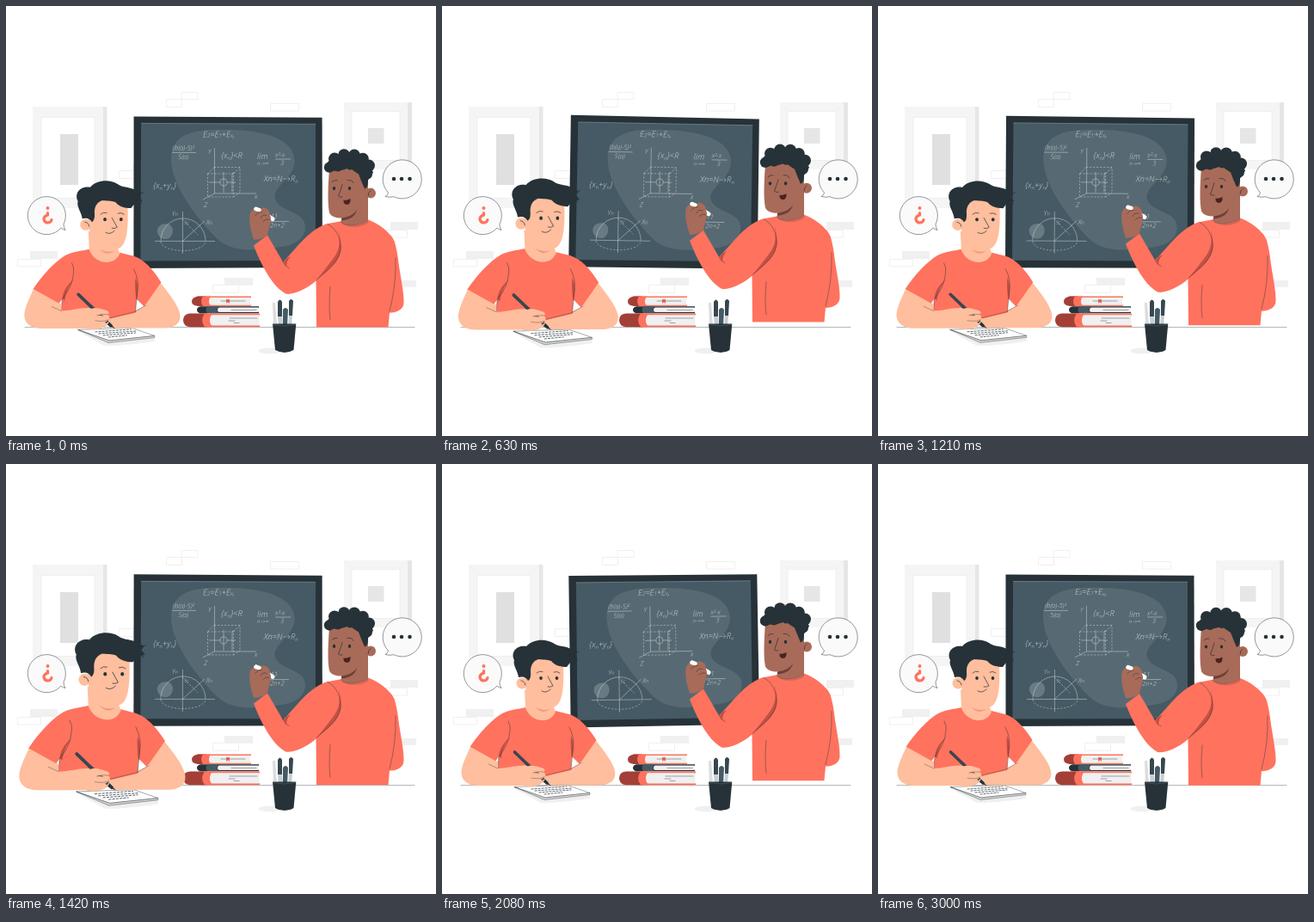
Write an HTML page that moves like this. It is 500 by 500 pixels and loops after 3.04 s.

```html
<!DOCTYPE html>
<html lang="en">
<head>
<meta charset="utf-8">
<title>Maths lesson</title>
<style>
  html, body { margin: 0; width: 100%; height: 100%; overflow: hidden; background: #fff; }
  svg { display: block; width: 100vmin; height: 100vmin; }
  .dark { fill: #263238; }
  .red { fill: #ff725e; }
  .deep { fill: #a33f37; }
  .skin { fill: #ffbe9d; }
  .brown { fill: #a86b59; }
  .pale { fill: #f0f0f0; }
  .line { fill: none; stroke: #263238; stroke-width: .7; stroke-linecap: round; stroke-linejoin: round; }
  .brick { fill: none; stroke: #f0f0f0; }
  .chalk { fill: none; stroke: #dfe5e7; stroke-width: .6; opacity: .75; }
  .dash { stroke-dasharray: 2.2 1.8; }
  text { font: italic 300 9.5px "Open Sans", Lato, sans-serif; fill: #dfe5e7; opacity: .85; }
  .small { font-size: 7.5px; }
  .sub { font-size: 6px; }
</style>
</head>
<body>
<svg viewBox="0 0 500 500">
  <!-- wall -->
  <g>
    <path fill="#e6e6e6" d="M113 117h4.500v118h-4.500z"/>
    <path fill="#f5f5f5" d="M31 117h82v118H31z"/>
    <path fill="#fff" stroke="#ebebeb" stroke-width=".7" d="M41 129.500h62v94H41z"/>
    <path class="brick" d="M31 117l10 12.500M113 117l-10 12.500M103 223.500l10 11.500" stroke-width=".7"/>
    <path fill="#e0e0e0" d="M63 149h21v59H63z"/>
    <path fill="#e6e6e6" d="M467 112h5v78h-5z"/>
    <path fill="#f5f5f5" d="M393 112h74v78h-74z"/>
    <path fill="#fff" stroke="#ebebeb" stroke-width=".7" d="M402 122.500h56v57h-56z"/>
    <path class="brick" d="M393 112l9 10.500M467 112l-9 10.500M458 179.500l9 10.500" stroke-width=".7"/>
    <path fill="#e6e6e6" d="M421 142h18.500v18H421z"/>
    <path class="brick" d="M186.500 108.500h18v9h-18zM204 100.500h19v8h-19zM307.500 113.500h33v8.500h-33zM131.500 191.500h18v9h-18zM13.500 294.500h27v8.500h-27zM240.500 324.500h30v9h-30zM437.500 260.500h29v8.500h-29z"/>
    <path class="pale" d="M28 285h32v9H28zM254 316h33v9h-33zM447 251h32v9h-32zM455 319h22v8h-22z"/>
  </g>

  <g id="board">
    <path class="dark" d="M148.500 128.500L367.500 129.700L368 304L148.500 305Z"/>
    <path fill="#455a64" d="M157 136.500L360 137.200L360 296L156.500 296.500Z"/>
    <path fill="#576a73" d="M192 178C192 156 207 145 240 144C275 143 325 146 334 172C343 198 308 208 313 225C319 240 348 238 348 257C348 273 331 280 312 281C290 284 262 287 245 270C225 250 192 210 192 178Z"/>
    <path d="M157 136.500L360 137.200" stroke="#7f9096" stroke-width=".7"/>
    <path fill="#687b83" d="M176 263C175 255 184 252 190 254C197 258 194 270 187 271C181 272 177 268 176 263Z"/>
    <path class="chalk" d="M193 170.500h28M313 178h18M306 250.500h23
      M242.500 165V218H291M242.500 218L229 225M253 193v24M236 205h13M257 205h10M249 205a4 4 0 1 0 8 0a4 4 0 1 0-8 0M263 217v-21q0-3 3-2
      M173 273.500h70M205.500 239v49M180 273a26 26 0 0 1 52 0M205.500 273.500L231 250"/>
    <path class="chalk dash" d="M234.500 195h30v27h-30zM242 187.500h30v30M264.500 195l7.500-7.500M234.500 195l7.500-7.500M264.500 222l7.500-5M180 274c2 14 50 14 52 0M205 248l18 18"/>
    <text x="229" y="152.500">E<tspan class="sub">2</tspan>=E<tspan class="sub">1</tspan>+E<tspan class="sub">x</tspan>,</text>
    <text class="small" x="194" y="167.500">(b(a)-5)²</text>
    <text class="small" x="200" y="178">5(a)</text>
    <text x="250" y="177">{x<tspan class="sub" dy="2">n</tspan><tspan dy="-2">}&lt;R</tspan></text>
    <text x="292" y="178">lim</text>
    <text class="sub" x="292" y="185">n→∞</text>
    <text class="small" x="313" y="175.500">x²-x</text>
    <text class="small" x="319" y="185">3</text>
    <text x="171" y="212">{x<tspan class="sub" dy="2">n</tspan><tspan dy="-2">+y</tspan><tspan class="sub" dy="2">n</tspan><tspan dy="-2">}</tspan></text>
    <text x="300" y="204">Xn=N→R<tspan class="sub" dy="2">n</tspan></text>
    <text class="small" x="235" y="172">Y</text>
    <text class="small" x="289" y="224">x</text>
    <text class="small" x="230" y="234">Z</text>
    <text class="small" x="193" y="244">Y<tspan class="sub">n</tspan></text>
    <text class="small" x="233" y="254">X<tspan class="sub">n</tspan></text>
    <text class="sub" x="207" y="254">5c</text>
    <text class="small" x="308" y="247">11</text>
    <text class="small" x="307" y="257.500">2n+2</text>
  </g>

  <path class="line" d="M22 373.500H475" stroke-width=".5" opacity=".5"/>

  <!-- books -->
  <g>
    <path class="red" d="M223 337.500h62v1.500h-62zM223 347.500h62v1.500h-62z"/>
    <path class="deep" d="M223 337.500h9v11.500h-9q-7-1-7-5.500t7-6z"/>
    <path class="red" d="M229 337.500h9q-4 6 0 11.500h-9q-4-6 0-11.500z"/>
    <path class="pale" d="M238 339h46v8.500h-46q-3-4 0-8.500z"/>
    <path class="red" d="M256 341h4v5l-2-1.500l-2 1.500z"/>
    <path class="dark" d="M226 349.300h68v1.500h-46v5h46v1.500h-68q-4-1-4-4t4-4z"/>
    <path fill="#455a64" d="M234 349.300h13q-3 4 0 8h-13q-3-4 0-8z"/>
    <path class="pale" d="M247 350.800h46v5h-46q-2-2 0-5z"/>
    <path class="red" d="M225 357.500h70v2h-70zM225 371.300h70v2h-70z"/>
    <path class="deep" d="M214 357.500h20v15.800h-20q-8-1-8-8t8-7.800z"/>
    <path class="red" d="M231 357.500h9q-6 8 0 15.800h-9q-6-8 0-15.800z"/>
    <path class="pale" d="M239 359.500h55.500v11.800H239q-4-6 0-11.800z"/>
    <path class="line" d="M250 343h28M262 353.500h29M260 363h32M259 366h7M265 368.500h6" opacity=".6" stroke-width=".5"/>
  </g>

  <!-- right bubble -->
  <path d="M444.500 217A22.500 22.500 0 1 1 451 221.700Q446 223 441 221.500Q444 220 444.500 217Z" fill="#fafafa" stroke="#263238" stroke-width=".5"/>
  <path d="M451 201h.01M460 201h.01M469.500 201h.01" stroke="#263238" stroke-width="4.600" stroke-linecap="round"/>

  <g id="teacher">
    <path class="red" d="M446 266C453 272 455 286 457 303C460 322 463 336 462.500 346C462 354 453 358 443 357Z"/>
    <path class="red" d="M388 251C396 249 410 247 421 249C432 253 447 263 452 275C456 303 447 330 446 357L444.500 373.800H361L360.500 320C348 331 332 337 325 335C309 326 296 300 288 279L304 267L322 298C336 285 350 262 372 254Z"/>
    <path fill="#a33f37" opacity=".65" d="M387 262C389 278 388 286 376 300C369 309 366 313 361 319C376 307 390 296 389.500 280C389 272 388 267 387 262Z"/>
    <path class="line" d="M374 254C384 259 390 271 389 284C386 301 371 309 361 319M377 327Q375 349 377 365M453 293Q454 325 446 355M322 298Q324 303 329 305" opacity=".6"/>
    <path fill="#a33f37" opacity=".7" d="M323 298q4-6 8-6q-5 4-5 12z"/>
    <path class="brown" d="M376 190C374 215 374 232 376 241C379 247 387 247 391 247L389 252C396 259 413 255 421 250L421 222L421 190Z"/>
    <circle class="brown" cx="424" cy="218" r="6"/>
    <path fill="#6f3f36" d="M390 247C399 246 406 242 408 237C407 245 400 249 390 250Z"/>
    <path fill="#263238" opacity=".2" d="M389 251.500C398 258 413 254 421 249.500L421 253C409 260 394 258 389 251.500Z"/>
    <g class="dark">
      <path d="M376 192L374 182L384 173L404 172L420 180L427 194L421 203Q421 212 417 213Q413 204 410 196Q405 193 400 189Q388 193 376 192Z"/>
      <circle cx="376" cy="188" r="6.200"/><circle cx="382" cy="178" r="7"/>
      <circle cx="393" cy="173.500" r="6.800"/><circle cx="405" cy="174" r="7"/>
      <circle cx="415" cy="178" r="6.800"/><circle cx="422" cy="186" r="7"/>
      <circle cx="420" cy="196" r="6"/><circle cx="400" cy="185" r="6"/>
      <circle cx="386" cy="187" r="6"/>
      <ellipse cx="381.500" cy="212.500" rx="1.700" ry="2.100"/><ellipse cx="399.500" cy="212.500" rx="1.700" ry="2.100"/>
    </g>
    <path class="line" d="M379 205q3-3 6-2M397 203q5-1 7 3" stroke-width="1.500"/>
    <path class="line" d="M391 208Q389 215 386.500 221.500Q388.500 223.500 391 222.500M424 215q-3 2-3 6"/>
    <path fill="#4a2320" d="M392.500 226Q396 227 400.500 224.500Q401 231 396.500 231.500Q392 231 392.500 226Z"/>
    <path d="M291 236.500L310 248" stroke="#fff" stroke-width="5" stroke-linecap="round"/>
    <path class="brown" d="M288 272C284 260 282 249 284 241C287 236 292 234 296 236C301 233 307 237 307 244C310 249 306 256 304 267Q296 273 288 272Z"/>
    <path d="M290.500 236.500l4 1" stroke="#fff" stroke-width="4.500" stroke-linecap="round"/>
    <path class="line" d="M290 244q2-4 7-4M296 247q2-5 7-3M299 251q4-4 7-2" opacity=".7"/>
  </g>

  <!-- pen cup -->
  <g>
    <ellipse class="pale" cx="307" cy="401" rx="13" ry="3.500"/>
    <path fill="#dcdcdc" d="M310 345h3l2 27h-4z"/>
    <path fill="#37474f" d="M316 344q2.500-5 5 0v17h-5zM329 343q2.500-4 5 0l-1 17h-4z"/>
    <path fill="#455a64" d="M322 353q3-4 6 0l-1 20h-5z"/>
    <path fill="#c7ced1" d="M316 361h5l1 12h-5zM329 360h4l-1 13h-4z"/>
    <path class="dark" d="M310 369.500H337.300L334.500 400Q324 406 313 400Z"/>
    <path d="M310.500 370.500q13 3 26.500 0" fill="none" stroke="#455a64" stroke-width=".8"/>
  </g>

  <!-- left bubble -->
  <path d="M64 258A22 22 0 1 1 67 253.500Q67 258 69 260.500Q66 260 64 258Z" fill="#fafafa" stroke="#263238" stroke-width=".5"/>
  <g fill="none" stroke="#ff725e" stroke-width="3.200" stroke-linecap="round">
    <path d="M48.500 235h.01" stroke-width="4"/>
    <path d="M48.500 240.500V243Q44 244.500 44 248Q45 252 49 252Q52.500 251.500 53 248.500"/>
  </g>

  <g id="student">
    <path class="pale" d="M84 377L113 393Q120 396 172 389V385Z"/>
    <path fill="#fff" stroke="#263238" stroke-width=".4" d="M84 375.500L120 388L172 382.500L146 373.500Z"/>
    <path fill="#d5d5d5" stroke="#263238" stroke-width=".4" d="M84 375.500L120 388L172 382.500V384.500L119 390.500Z"/>
    <path class="line dash" d="M104 378L145 375M108 380L151 377M113 382L150 379M119 384L140 382" stroke-width=".8"/>
    <path class="skin" d="M176 318C188 333 199 347 201 357C203 368 195 373.500 182 373.500H122L118 361L149 354L163 347L154 335Z"/>
    <path class="red" d="M97 283C88 285 78 286 70 290C58 297 43 313 32.500 329L62 346L66 340L65 356L120 363L150 356L151 340L160 349L179.500 321C170 306 160 295 148 291L132 287Z"/>
    <path fill="#a33f37" opacity=".7" d="M150 316C154 324 153 334 151 343C150 334 149 325 150 316ZM66 340C67 330 73 323 79 318C73 326 70 333 69 342Z"/>
    <path class="line" d="M77 299Q80 304 79 310Q78 326 66 340L65 353M148 306Q155 319 152 334L150 355" opacity=".65"/>
    <path class="skin" d="M96 262L97 284C104 301 126 303 132 288L128 278Z"/>
    <path class="skin" d="M96 238C96 260 98 273 106 281C112 288 126 286 133 281C141 275 142 255 141 232L122 218Z"/>
    <circle class="skin" cx="93" cy="255" r="6.500"/>
    <path fill="#ee9a82" d="M109 283Q117 288 126 285Q117 292 109 283Z"/>
    <path class="dark" d="M89 248C88 240 82 234 84 228C79 218 88 210 98 212C106 203 121 203 129 208C135 213 145 211 151 216L157 219L154 223L158 228L149 231L145 236C137 236 131 234 127 229C122 227 116 228 112 227C106 229 103 234 103 241Q104 250 100 252Q97 246 89 248Z"/>
    <path class="line" d="M148 222L159 218M148 226L157 231"/>
    <g class="dark"><ellipse cx="115" cy="249" rx="1.800" ry="2.100"/><ellipse cx="133.500" cy="249" rx="1.800" ry="2.100"/></g>
    <path class="line" d="M110 243q3-3 7-1.500M130 242q4-1.500 7 1" stroke-width="1.500"/>
    <path class="line" d="M123 247L129 258Q126 260 123 259M116 264Q121 267 126 262M92 252q4 0 5 5" stroke-width=".9"/>
    <path d="M84.500 335L122 371" stroke="#37474f" stroke-width="3.600" stroke-linecap="round"/>
    <path class="dark" d="M119 366L127 374.500L116 369Z"/>
    <path class="skin" d="M33 329C28 340 23 350 22.500 358C22 368 30 374 42 374H94C104 377 120 374 120 364C122 356 110 350 102 351C90 349 76 354 65 354L65 346L62 345Z"/>
    <path d="M98 348L118 367" stroke="#37474f" stroke-width="3.600"/>
    <path class="skin" d="M92 357C97 350 104 349 115 353Q121 354 119 358Q111 358 106 359Q116 359 119 363Q118 368 108 367L94 366Z"/>
    <path class="line" d="M106 359Q112 357 119 358M104 365Q113 367 119 364M54 349L65 354M121 362L149 355L163 347" stroke-width=".5" opacity=".5"/>
  </g>
</svg>
<script>
  const LOOP = 3040, LEAD = 40;
  const board = document.getElementById('board');
  const teacher = document.getElementById('teacher');
  const student = document.getElementById('student');

  // Linear interpolation through [position, value] stops
  function track(stops, p) {
    const i = stops.findIndex(s => s[0] > p);
    const [a, from] = stops[i - 1], [b, to] = stops[i];
    return from + (to - from) * (p - a) / (b - a);
  }

  const sway = [[0, 0], [.25, 1], [.75, -1], [1, 0]];
  const lift = [[0, 0], [.5, -7], [1, 0]];
  const beat = [[0, 1], [.1, 1.1], [.3, 1], [.4, 1], [.5, 1.1], [.6, 1], [1, 1]];

  function draw(now) {
    const p = (now + LEAD) % LOOP / LOOP;
    board.setAttribute('transform', `rotate(${track(sway, p)} 258 217)`);
    teacher.setAttribute('transform', `translate(0 ${track(lift, p * 2 % 1)})`);
    student.setAttribute('transform', `translate(112 308) scale(${track(beat, p)}) translate(-112 -308)`);
  }

  const start = performance.now();
  function tick() {
    draw(performance.now() - start);
    requestAnimationFrame(tick);
  }
  tick();
</script>
</body>
</html>
```
